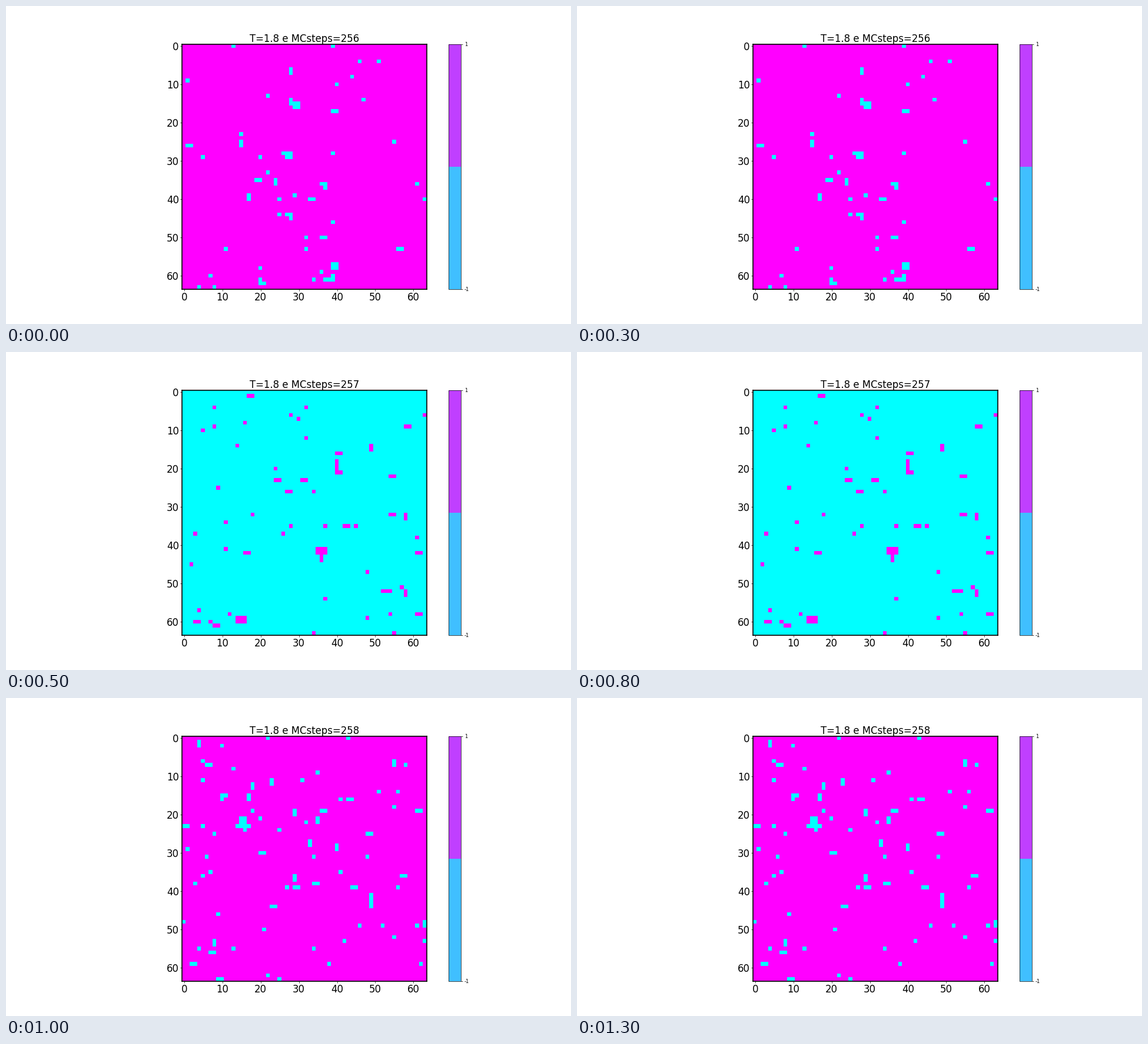
These frames come from a looping animation (960x540 px, 1.5 s). A matplotlib script:

```python
import numpy as np
import matplotlib.pyplot as plt
from matplotlib.animation import FuncAnimation

SIZE = 64
FIRST_STEP = 256
FONT_SIZE = 11.9

plt.rcParams.update({
    "font.family": "DejaVu Sans",
    "font.size": FONT_SIZE,
    "axes.titlesize": FONT_SIZE,
    "axes.titlepad": 3,
    "axes.linewidth": 1.2,
    "xtick.major.size": 2, "ytick.major.size": 2,
    "xtick.major.pad": 2, "ytick.major.pad": 2,
    "xtick.major.width": 0.5, "ytick.major.width": 0.5,
})


def lattice(step, loose, clusters):
    """Aligned spins with scattered flips and a few larger clusters."""
    rng = np.random.default_rng(step)
    spin = 1 if step % 2 == 0 else -1
    grid = np.full((SIZE, SIZE), spin)

    def flip(col, row, w=1, h=1):
        grid[row:row + h, col:col + w] = -spin

    for _ in range(loose):
        col, row = rng.integers(SIZE, size=2)
        # About one flip in four drags a neighbour along.
        w, h = [(2, 1), (1, 2)][rng.integers(2)] if rng.random() < 0.25 else (1, 1)
        flip(col, row, w, h)
    for block in clusters:
        flip(*block)
    return grid


# Clusters are (column, row, width, height).
states = [
    lattice(FIRST_STEP, 50,
            [(28, 14, 1, 2), (29, 15, 2, 2), (27, 28, 2, 2), (39, 57, 2, 2)]),
    lattice(FIRST_STEP + 1, 53,
            [(40, 18, 1, 4), (35, 41, 3, 2), (36, 43, 1, 2), (52, 52, 3, 1),
             (14, 59, 3, 2)]),
    lattice(FIRST_STEP + 2, 78,
            [(15, 21, 2, 3), (14, 23, 4, 1), (49, 41, 1, 4)]),
]

fig, ax = plt.subplots(figsize=(9.6, 5.4), dpi=100)
image = ax.imshow(states[0], cmap="cool", vmin=-1, vmax=1,
                  interpolation="nearest")
ax.set_xticks(range(0, SIZE, 10))
ax.set_yticks(range(0, SIZE, 10))

bar = fig.colorbar(image, boundaries=[-1, 0, 1], ticks=[-1, 1])
bar.ax.set_yticklabels(["-1", "1"], fontsize=6)
bar.outline.set_linewidth(0.5)


def update(i):
    image.set_data(states[i])
    ax.set_title(f"T=1.8 e MCsteps={FIRST_STEP + i}")


anim = FuncAnimation(fig, update, frames=len(states), interval=500,
                     repeat=True, repeat_delay=0, blit=False)
plt.show()
```
